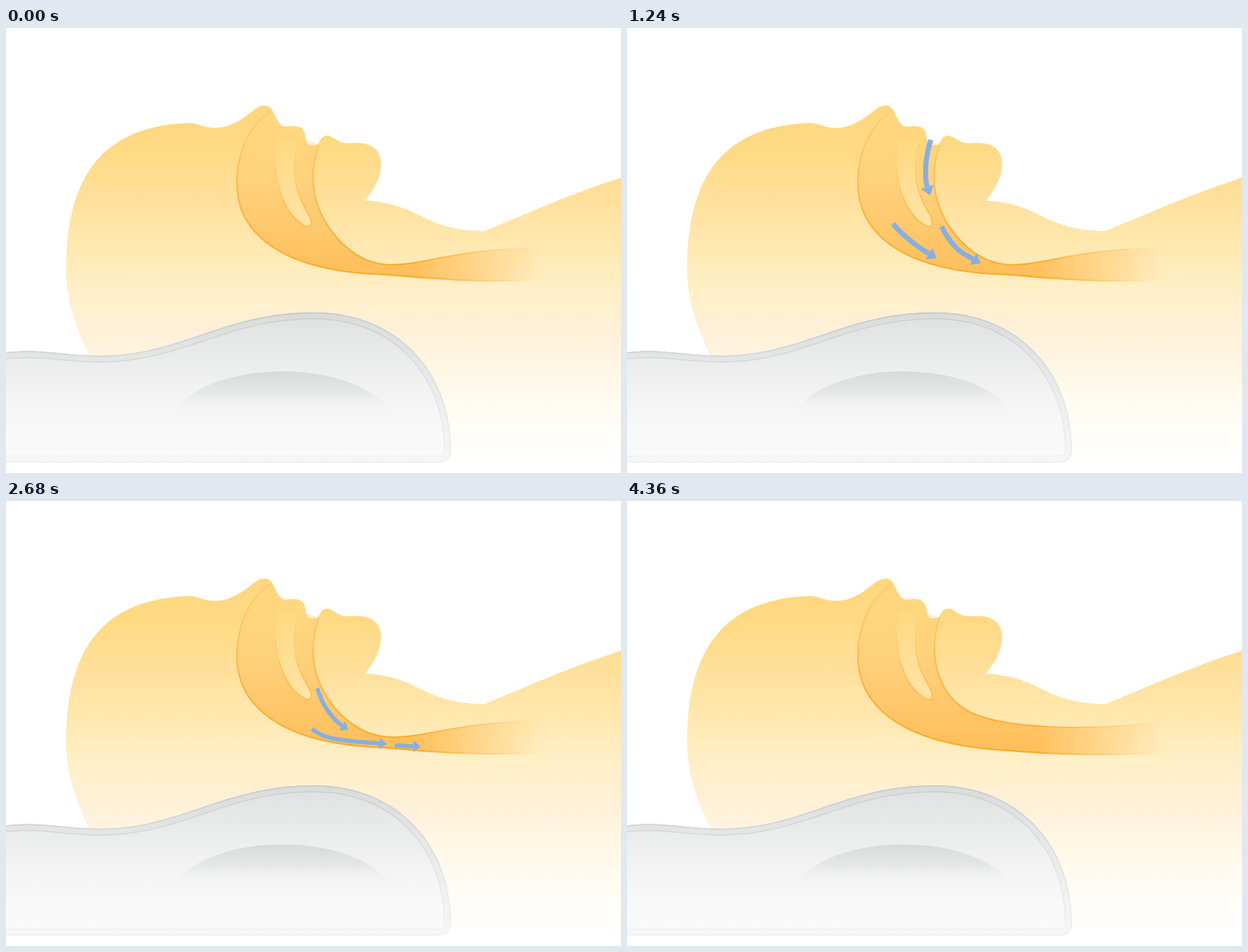
Write an HTML page with a canvas that moves like this. It is 879 px wide and 637 px high and loops after 4840 ms.

```html
<!DOCTYPE html>
<html lang="en">
<head>
<meta charset="utf-8">
<title>Airflow</title>
<style>
  html, body { margin: 0; width: 100%; height: 100%; overflow: hidden; background: #fff; }
  canvas { display: block; }
</style>
</head>
<body>
<canvas id="stage" width="879" height="637"></canvas>
<script>
const W = 879, H = 637, LOOP = 4840, STEP = 40;
const ctx = document.getElementById('stage').getContext('2d');
const layer = document.createElement('canvas');
layer.width = W;
layer.height = H;
const air = layer.getContext('2d');

const mix = (a, b, k) => a + (b - a) * k;
const ramp = (t, a, b) => Math.max(0, Math.min(1, (t - a) / (b - a)));
const smooth = v => v * v * (3 - 2 * v);
const blend = (a, b, k) => a.map((p, i) => p.map((v, j) => mix(v, b[i][j], k)));

// Evenly spaced colors along one axis
function gradient(g, axis, from, to, colors) {
  const fill = axis === 'y' ? g.createLinearGradient(0, from, 0, to) : g.createLinearGradient(from, 0, to, 0);
  colors.forEach((color, i) => fill.addColorStop(i / (colors.length - 1), color));
  return fill;
}

function stroke(g, path, style, width) {
  g.strokeStyle = style;
  g.lineWidth = width;
  g.stroke(path);
}

function fill(g, path, style) {
  g.fillStyle = style;
  g.fill(path);
}

// Body
const skin = gradient(ctx, 'y', 110, 630, ['#ffd67d', '#ffda85', '#ffe09a', '#ffe7ae', '#ffefc6',
  '#fef0d8', '#fff8e8', '#fffdf7', '#fff']);
const body = new Path2D(`M118,467 C96,420 86,385 86,345 C86,210 140,140 262,136
  C278,137 282,143 298,143 C330,143 350,118 361,113 C368,110 376,110 380,117
  C388,131 390,141 400,141 C416,139 426,140 428,155 C430,169 433,168 442,168
  C450,167 447,154 460,154 C470,156 475,166 492,165 C525,162 537,177 536,197
  C534,222 520,238 513,247 C595,252 590,288 683,291 C740,268 800,240 880,214 V637 H300 Z`);

// Airway walls: a start point, then cubic segments
const lower = {
  shut: [[379, 118], [343, 142, 330, 185, 330, 222], [330, 285, 380, 349, 545, 353], [600, 358, 690, 366, 765, 359]],
  open: [[379, 118], [343, 142, 330, 185, 330, 222], [330, 285, 380, 349, 545, 357], [600, 362, 690, 366, 765, 359]]
};
const upper = {
  shut: [[447, 167], [436, 200, 436, 230, 447, 258], [462, 296, 500, 339, 550, 339], [600, 339, 640, 316, 765, 315]],
  open: [[447, 167], [436, 200, 436, 230, 450, 260], [469, 303, 510, 318, 600, 323], [650, 326, 700, 324, 765, 316]]
};
const palate = new Path2D(`M388,158 C378,200 392,262 424,281 C432,287 438,284 436,276
  C433,259 400,235 417,162`);

const airFill = gradient(air, 'y', 115, 345,
  ['rgba(255,205,112,0)', 'rgba(255,205,112,.4)', '#ffd07a', '#ffc86c', '#ffc05c']);
const wallLine = gradient(air, 'y', 115, 345,
  ['rgba(250,190,80,.3)', 'rgba(250,186,74,.5)', '#fcba50', '#fdb240', '#fdab2a']);
const palateLine = gradient(air, 'y', 155, 285, ['rgba(250,185,75,0)', 'rgba(250,185,75,.4)', '#fdbb50']);
const airFade = gradient(air, 'x', 585, 765, ['#000', 'transparent']);

function wallPath([start, ...cubics]) {
  const path = new Path2D();
  path.moveTo(...start);
  cubics.forEach(c => path.bezierCurveTo(...c));
  return path;
}

// Same wall walked from its far end
function reversed(wall) {
  const flat = wall.flat(), pts = [];
  for (let i = flat.length - 2; i >= 0; i -= 2) pts.push(flat[i], flat[i + 1]);
  return wall.map((part, i) => i ? pts.slice(i * 6 - 4, i * 6 + 2) : pts.slice(0, 2));
}

function drawAirway(open) {
  const floor = blend(lower.shut, lower.open, open), roof = blend(upper.shut, upper.open, open);
  const tube = wallPath(floor), [end, ...back] = reversed(roof);
  tube.lineTo(...end);
  back.forEach(c => tube.bezierCurveTo(...c));
  tube.lineTo(428, 160);
  tube.lineTo(395, 142);

  air.globalCompositeOperation = 'source-over';
  air.clearRect(0, 0, W, H);
  fill(air, tube, airFill);
  fill(air, palate, skin);
  stroke(air, palate, palateLine, 2);
  stroke(air, wallPath(floor), wallLine, 2.4);
  stroke(air, wallPath(roof), wallLine, 2.2);
  air.globalCompositeOperation = 'destination-in';
  air.fillStyle = airFade;
  air.fillRect(0, 0, W, H);
  ctx.drawImage(layer, 0, 0);
}

// Pillow
const pillow = new Path2D(`M-20,467 C45,456 75,469 135,469 C250,469 310,407 440,407
  C562,407 636,495 636,604 Q636,622 618,622 H-20 Z`);
const hollow = new Path2D('M240,550 C290,472 500,472 550,550 Z');
const pillowFill = gradient(ctx, 'y', 408, 622, ['#dfe0e0', '#e8e9e9', '#f1f2f1', '#f7f8f7', '#fafafa']);
const pillowRim = gradient(ctx, 'y', 408, 622, ['#dadbdb', '#e5e6e6', '#f0f0f0', '#f7f7f7']);
const pillowLine = gradient(ctx, 'y', 408, 622, ['#cacbcb', '#d7d8d8', '#e5e6e5', '#f0f0ef']);
const hollowFill = gradient(ctx, 'y', 490, 550, ['rgba(208,209,210,.75)', 'rgba(216,217,218,.5)', 'rgba(240,241,240,0)']);

function drawPillow() {
  ctx.save();
  ctx.clip(pillow);
  fill(ctx, pillow, pillowFill);
  // Nested strokes inside the clip make the seam and the rim
  stroke(ctx, pillow, pillowLine, 20);
  stroke(ctx, pillow, pillowRim, 17);
  stroke(ctx, pillow, pillowLine, 3.5);
  fill(ctx, hollow, hollowFill);
  ctx.restore();
}

// Air arrows
const throat = {
  shut: [[434, 161], [427, 215], [442, 262], [458, 299], [488, 327], [556, 350], [742, 350], [1000, 340]],
  open: [[434, 161], [427, 215], [444, 250], [481, 301], [515, 327], [565, 343], [742, 350], [1000, 340]]
};
const nose = [[560, -105], [473, 5], [414, 87], [362, 165], [366, 258], [430, 322], [506, 345], [742, 350], [1000, 340]];
const mouth = (lead, open) => [...lead, ...blend(throat.shut, throat.open, open)];

// Each arrow's tip passes one stop [x, y, arrow length] per beat
const BEATS = [600, 1240, 1760, 2680, 3400, 3720];
const EXIT = [880, 344, 120];
const arrows = [
  { start: 420, route: () => nose,
    stops: [[414, 87, 101], [441, 331, 80], [506, 345, 80], [545, 348, 111], [742, 350, 143], EXIT] },
  { start: 400, route: open => mouth([[540, -40], [487, 52], [445, 133]], open),
    stops: [[445, 133, 91], [502, 342, 79], [556, 350, 34], [596, 350, 37], [772, 347, 82], EXIT] },
  { start: 575, route: open => mouth([[640, -110], [556, -3], [502, 58], [460, 112]], open),
    stops: [[502, 58, 85], [428, 241, 81], [457, 300, 77], [489, 328, 76], [565, 343, 95], EXIT] }
];

// Catmull-Rom route as samples [x, y, distance]
function measure(pts) {
  const out = [[...pts[0], 0]];
  for (let i = 0; i < pts.length - 1; i++) {
    const a = pts[Math.max(i - 1, 0)], b = pts[i], c = pts[i + 1], d = pts[Math.min(i + 2, pts.length - 1)];
    for (let n = 1; n <= 24; n++) {
      const u = n / 24, e = smooth(u), last = out[out.length - 1];
      const [x, y] = [0, 1].map(k => mix(b[k], c[k], e)
        + (c[k] - a[k]) / 2 * u * (1 - u) ** 2 - (d[k] - b[k]) / 2 * u * u * (1 - u));
      out.push([x, y, last[2] + Math.hypot(x - last[0], y - last[1])]);
    }
  }
  return out;
}

function locate(line, [x, y]) {
  const gap = p => Math.hypot(p[0] - x, p[1] - y);
  return line.reduce((best, p) => gap(p) < gap(best) ? p : best)[2];
}

function pointAt(line, s) {
  const i = Math.max(1, line.findIndex(p => p[2] >= s));
  const a = line[i - 1], b = line[i], k = (s - a[2]) / (b[2] - a[2]);
  return [mix(a[0], b[0], k), mix(a[1], b[1], k)];
}

// Monotone cubic through the beats, steady before the first one
function glide(values, i, t) {
  const slope = j => (values[j + 1] - values[j]) / (BEATS[j + 1] - BEATS[j]);
  const tangent = j => {
    if (j === 0) return slope(0);
    if (j === BEATS.length - 1) return slope(j - 1);
    const a = slope(j - 1), b = slope(j);
    return a * b > 0 ? 2 * a * b / (a + b) : 0;
  };
  if (t < BEATS[0]) return values[0] + slope(0) * (t - BEATS[0]);
  const h = BEATS[i + 1] - BEATS[i], u = (t - BEATS[i]) / h;
  return mix(values[i], values[i + 1], smooth(u))
    + h * (tangent(i) * u * (1 - u) ** 2 - tangent(i + 1) * u * u * (1 - u));
}

function drawArrow({ start, route, stops }, t, open) {
  if (t < start || t >= BEATS[BEATS.length - 1]) return;
  const line = measure(route(open));
  const i = Math.max(0, BEATS.findLastIndex(beat => beat <= t));
  const tip = glide(stops.map(stop => locate(line, stop)), i, t);
  const length = mix(stops[i][2], stops[i + 1][2], ramp(t, BEATS[i], BEATS[i + 1]));
  const width = mix(10, 6, ramp(t, 600, 1500));
  const base = tip - width * 1.75, tail = tip - length;
  const [tx, ty] = pointAt(line, tip), [bx, by] = pointAt(line, base);
  const d = Math.hypot(tx - bx, ty - by) || 1;
  const px = (by - ty) / d * width * 1.35, py = (tx - bx) / d * width * 1.35;

  ctx.globalAlpha = ramp(t, start, start + 200) * (1 - ramp(tx, 740, 850));
  ctx.strokeStyle = ctx.fillStyle = '#88afe0';
  ctx.lineWidth = width;
  ctx.beginPath();
  ctx.moveTo(...pointAt(line, tail));
  line.filter(p => p[2] > tail && p[2] < base).forEach(p => ctx.lineTo(p[0], p[1]));
  ctx.lineTo(bx, by);
  ctx.stroke();
  ctx.beginPath();
  ctx.moveTo(tx, ty);
  ctx.lineTo(bx + px, by + py);
  ctx.lineTo(bx - px, by - py);
  ctx.fill();
  ctx.globalAlpha = 1;
}

// White arrow lifting the throat
const lift = new Path2D('M0,0 L19,17 H10 V54 H-10 V17 H-19 Z');
const liftFill = gradient(ctx, 'y', 0, 54, ['#fff', '#fff', 'rgba(255,255,255,0)']);

function drawLift(t) {
  const shown = smooth(ramp(t, 2760, 3200));
  ctx.save();
  ctx.globalAlpha = shown * (1 - ramp(t, 3920, 4360));
  ctx.translate(557, 262);
  ctx.rotate(0.33);
  ctx.translate(0, 18 * (1 - shown));
  fill(ctx, lift, liftFill);
  ctx.restore();
}

function draw(t) {
  const open = smooth(ramp(t, 2600, 3160));
  ctx.clearRect(0, 0, W, H);
  fill(ctx, body, skin);
  drawAirway(open);
  drawPillow();
  drawLift(t);
  arrows.forEach(arrow => drawArrow(arrow, t, open));
}

let began;
function frame() {
  const now = performance.now();
  began ??= now;
  draw(Math.floor((now - began) % LOOP / STEP) * STEP);
  requestAnimationFrame(frame);
}
frame();
</script>
</body>
</html>
```
